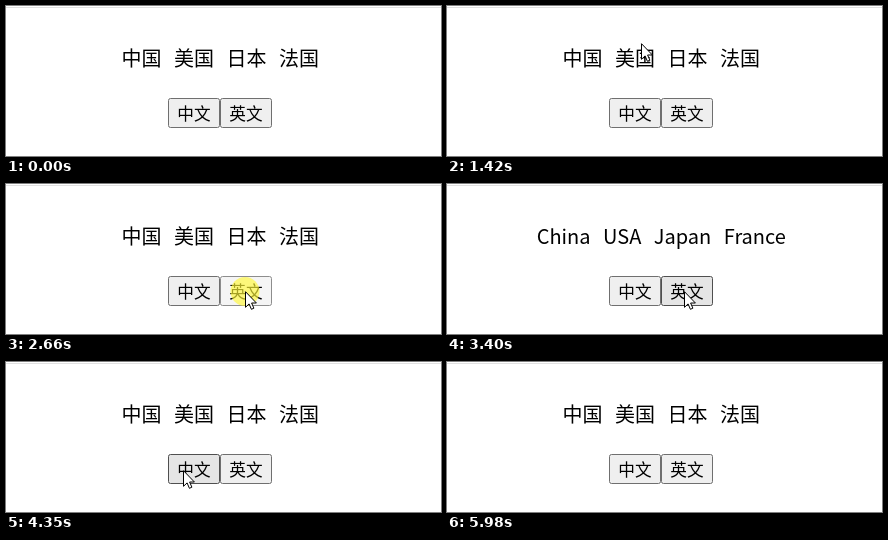
Recreate the animation shown at these times as an HTML page. Size 435 by 150 pixels, loop 7.12 s.

```html
<!DOCTYPE html>
<html lang="zh-CN">
<head>
<meta charset="utf-8">
<title>中文 / 英文</title>
<style>
  html, body { margin: 0; width: 100%; height: 100%; overflow: hidden; background: #fff; }
  svg { display: block; width: 435px; height: 150px; }
  text { font-family: "Noto Sans CJK SC", "Noto Sans CJK", "Noto Sans CJK JP", sans-serif; text-anchor: middle; fill: #000; }
  #words { font-size: 20px; word-spacing: 8px; }
  .button text { font-size: 16.67px; }
  .button rect { fill: #efefef; stroke: #6f6f6f; }
  .button.hover rect { fill: #e5e5e5; stroke: #4f4f4f; }
  .button.active rect { fill: #f5f5f5; stroke: #8d8d8d; }
</style>
</head>
<body>
<svg viewBox="0 0 435 150">
  <rect y="1" width="435" height="1" fill="#e0e0e0"/>
  <text id="words" x="214.3" y="60"></text>
  <g class="button">
    <rect x="162.5" y="92.5" width="51" height="29" rx="2"/>
    <text x="188" y="114">中文</text>
  </g>
  <g class="button">
    <rect x="214.5" y="92.5" width="51" height="29" rx="2"/>
    <text x="240" y="114">英文</text>
  </g>
  <circle id="halo" r="14.5" fill="#fff838" fill-opacity=".65"/>
  <path id="cursor" d="M.5 .7V16.3L4.1 12.9L6.4 18.3L8.9 17.2L6.6 12H11.4Z" fill="#fff" stroke="#000"/>
</svg>
<script>
const LOOP = 7120, STEP = 70;
const CHINESE = '中国 美国 日本 法国', ENGLISH = 'China USA Japan France';
const ENTER = 1010, EXIT = 5980;

const linear = u => u;
const smooth = u => u * u * (3 - 2 * u);
const easeOut = u => 1 - (1 - u) ** 3;

// The pointer glides from one stop to the next and rests in between.
const entry = { x: 378, y: 138 };
const glides = [
  { from: 1140, to: 1420, x: 194, y: 37, ease: linear },
  { from: 1420, to: 1910, x: 189, y: 117, ease: smooth },
  { from: 1910, to: 2260, x: 239, y: 110, ease: smooth },
  { from: 2450, to: 2590, x: 239, y: 107, ease: linear },
  { from: 3320, to: 4020, x: 177, y: 108, ease: smooth },
  { from: 5210, to: 5420, x: 313, y: 122, ease: linear },
  { from: 5420, to: 5910, x: 416, y: 146, ease: easeOut }
];
const clicks = [
  { down: 2590, up: 2730, text: ENGLISH },
  { down: 4220, up: 4350, text: CHINESE }
];

const words = document.getElementById('words');
const cursor = document.getElementById('cursor');
const halo = document.getElementById('halo');
const buttons = [...document.querySelectorAll('.button')];

function pointerAt(t) {
  const index = glides.findLastIndex(g => t >= g.from);
  if (index < 0) return entry;
  const glide = glides[index];
  const origin = glides[index - 1] || entry;
  const elapsed = Math.floor((t - glide.from) / STEP) * STEP;
  const u = glide.ease(Math.min(1, elapsed / (glide.to - glide.from)));
  const mix = axis => Math.round(origin[axis] + (glide[axis] - origin[axis]) * u);
  return { x: mix('x'), y: mix('y') };
}

function place(element, visible, x, y) {
  element.setAttribute('visibility', visible ? 'visible' : 'hidden');
  element.setAttribute('transform', `translate(${x} ${y})`);
}

function render(t) {
  const { x, y } = pointerAt(t);
  const pressed = clicks.some(c => t >= c.down && t < c.up);
  const lastClick = clicks.findLast(c => t >= c.up);

  words.textContent = lastClick ? lastClick.text : CHINESE;
  place(cursor, t >= ENTER && t < EXIT, x, y);
  place(halo, pressed, x, y + .5);
  buttons.forEach((button, i) => {
    const left = 162 + 52 * i;
    const hover = x >= left && x < left + 52 && y >= 92 && y < 122;
    button.classList.toggle('hover', hover);
    button.classList.toggle('active', hover && pressed);
  });
}

const start = performance.now();
function tick() {
  render((performance.now() - start) % LOOP);
  requestAnimationFrame(tick);
}
tick();
</script>
</body>
</html>
```
